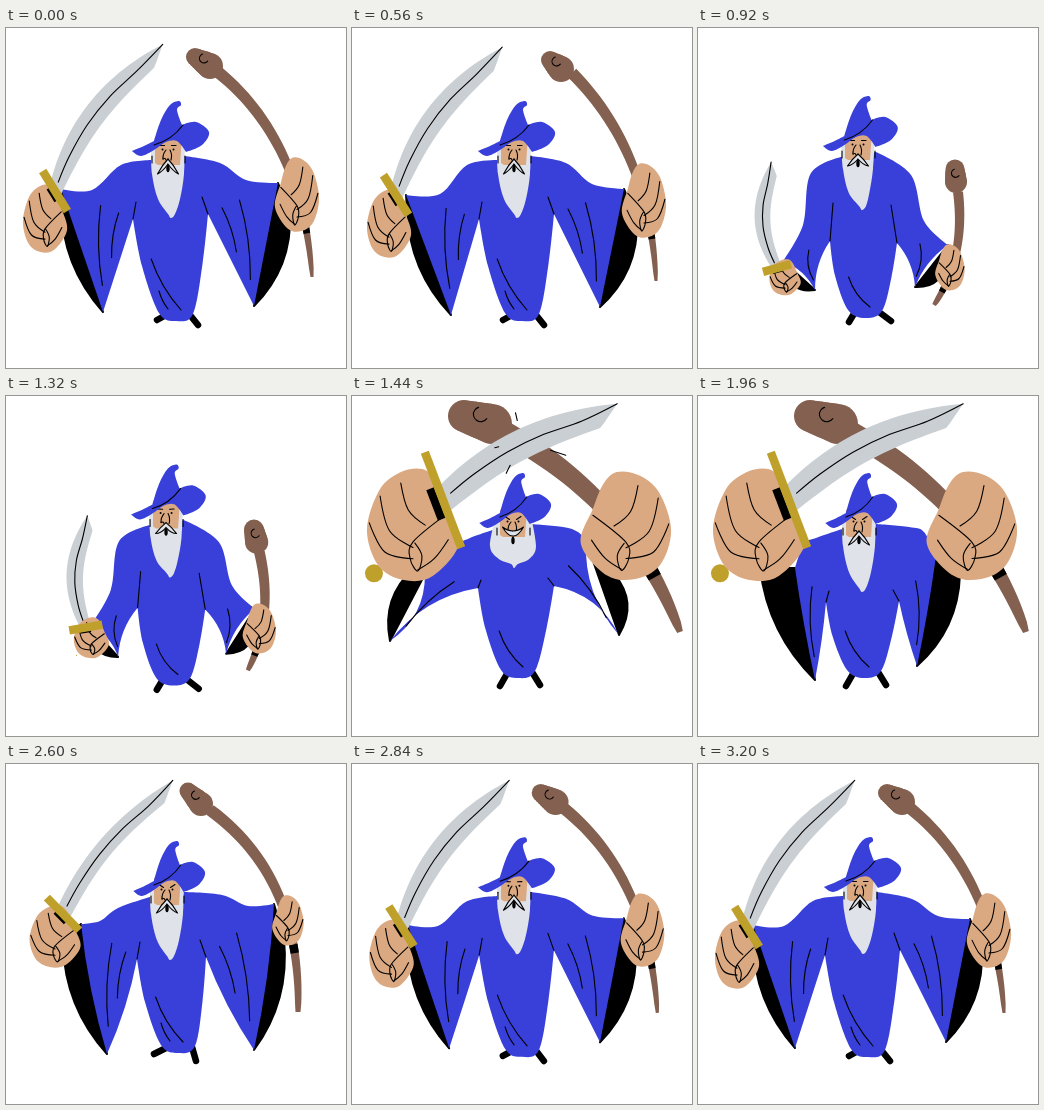
Recreate the animation shown at these times as an HTML page with a canvas. Size 340 px wide and 340 px high, loop 3720 ms.

```html
<!DOCTYPE html>
<html lang="en">
<head>
<meta charset="utf-8">
<title>Wizard</title>
<style>
html, body { margin: 0; width: 100%; height: 100%; overflow: hidden; background: #fff; }
canvas { display: block; width: 100%; height: 100%; }
</style>
</head>
<body>
<canvas id="stage"></canvas>
<script>
const LOOP = 3720, SIZE = 340;
const BLUE = '#3840d9', SKIN = '#dba981', STEEL = '#cacfd4', HAIR = '#dfe2e8',
      WOOD = '#83604f', GOLD = '#bfa02b', INK = '#000';

// Rig settings; arms and fists are listed left, right.
const rest = {
  neck: 132, hem: [170, 293], toes: [[151, 292], [192, 297]],
  fall: 0, crease: 17, full: 1, drape: 62,
  arms: [
    { shoulder: [115, 137], elbow: [86, 162], wrist: [55, 161], tip: [97, 284], heel: [55, 175], pit: [127, 191] },
    { shoulder: [214, 135], elbow: [240, 152], wrist: [272, 155], tip: [248, 278], heel: [284, 185], pit: [202, 186] }
  ],
  head: { at: [0, 0], hat: 1, brow: 0, beard: [165, 190], puff: 0, droop: 15 },
  sword: { at: [49, 163], len: 182, turn: -53.7, half: 7, bow: 21, guard: 47, tilt: 22, pommel: 0 },
  staff: { tail: [306, 249], bend: [297, 113], neck: [212, 44], thin: 1.5, thick: 6, ring: .185,
           far: [189, 29, 9], near: [204, 38, 13] },
  fists: [[39, 190, 22.5, 34], [291, 166, 22.5, 37]]
};

const sway = {
  ...rest,
  arms: [
    { ...rest.arms[0], elbow: [88, 166], wrist: [54, 167], tip: [99, 287], heel: [55, 181] },
    { ...rest.arms[1], elbow: [240, 156], wrist: [272, 161], tip: [248, 279], heel: [285, 192] }
  ],
  sword: { ...rest.sword, at: [44, 167], turn: -54.3 },
  staff: { ...rest.staff, tail: [304, 253], bend: [298, 123], neck: [220, 45], far: [198, 32, 9], near: [209, 41, 13] },
  fists: [[37, 195, 22.5, 34], [292, 172, 22.5, 37]]
};

const low = {
  neck: 128, hem: [167, 290], toes: [[151, 294], [193, 293]],
  fall: -4, crease: 38, full: 0, drape: 41,
  arms: [
    { shoulder: [113, 145], elbow: [105, 197], wrist: [85, 233], tip: [117, 262], heel: [92, 238], pit: [132, 213] },
    { shoulder: [213, 147], elbow: [226, 193], wrist: [250, 217], tip: [217, 259], heel: [246, 230], pit: [199, 215] }
  ],
  head: { at: [-2, -5], hat: .97, brow: 0, beard: [164, 182], puff: -1, droop: 12 },
  sword: { at: [79, 240], len: 106, turn: -93.2, half: 5, bow: 17, guard: 29, tilt: -12, pommel: 0 },
  staff: { tail: [236, 277], bend: [268, 229], neck: [260, 164], thin: 2, thick: 5, ring: .15,
           far: [257, 141, 9.5], near: [258, 154, 11] },
  fists: [[87, 249, 16, 18], [252, 239, 15, 23]]
};

const clash = {
  neck: 132, hem: [166, 282], toes: [[148, 290], [188, 289]],
  fall: -10, crease: 8, full: 0, drape: 47,
  arms: [
    { shoulder: [118, 142], elbow: [100, 152], wrist: [73, 178], tip: [38, 245], heel: [62, 172], pit: [126, 192] },
    { shoulder: [211, 131], elbow: [226, 136], wrist: [234, 145], tip: [267, 239], heel: [262, 178], pit: [202, 190] }
  ],
  head: { at: [-1, 4], hat: .93, brow: 2, beard: [162, 172], puff: 7, droop: -4 },
  sword: { at: [91, 104], len: 199, turn: -28.9, half: 13, bow: 19, guard: 102, tilt: 8, pommel: 9 },
  staff: { tail: [328, 236], bend: [280, 106], neck: [154, 37], thin: 3, thick: 11, ring: .24,
           far: [112, 20, 16], near: [140, 28, 20] },
  fists: [[61, 128, 47, 56], [274, 129, 46, 54]]
};

const cross = {
  ...clash, fall: 1, crease: 11,
  arms: [
    { ...clash.arms[0], elbow: [106, 148], wrist: [97, 172], tip: [117, 284], pit: [128, 206] },
    { ...clash.arms[1], wrist: [238, 160], tip: [219, 270], pit: [201, 205] }
  ],
  head: { ...clash.head, beard: [164, 196], puff: 0, droop: 14 }
};

const open = {
  neck: 132, hem: [172, 289], toes: [[148, 290], [190, 297]],
  fall: 3, crease: 17, full: 1, drape: 56,
  arms: [
    { shoulder: [112, 144], elbow: [94, 157], wrist: [75, 160], tip: [101, 290], heel: [57, 180], pit: [131, 195] },
    { shoulder: [216, 131], elbow: [242, 142], wrist: [268, 140], tip: [248, 286], heel: [278, 175], pit: [200, 193] }
  ],
  head: cross.head,
  sword: { at: [57, 150], len: 173, turn: -50.6, half: 8, bow: 14, guard: 46, tilt: 6, pommel: 0 },
  staff: { tail: [292, 248], bend: [296, 113], neck: [204, 46], thin: 2.5, thick: 6, ring: .25,
           far: [182, 27, 8.5], near: [195, 40, 12] },
  fists: [[49, 172, 26, 31], [282, 156, 16, 25]]
};

const smooth = u => u * u * (3 - 2 * u);
const speedUp = u => u * u;
const overshoot = u => 1 + (u - 1) ** 2 * (2 * (u - 1) + 1);

const MOVES = [
  { start: 0, from: rest, to: rest, count: 1, gap: 560, ease: smooth },
  { start: 560, from: rest, to: sway, count: 1, gap: 120, ease: smooth },
  { start: 680, from: sway, to: low, count: 4, gap: 80, ease: smooth },
  { start: 1320, from: low, to: clash, count: 4, gap: 40, ease: speedUp },
  { start: 1480, from: clash, to: cross, count: 13, gap: 40, ease: overshoot },
  { start: 2440, from: cross, to: open, count: 3, gap: 80, ease: smooth },
  { start: 2680, from: open, to: rest, count: 7, gap: 80, ease: overshoot }
];

function mix(a, b, k) {
  if (typeof a === 'number') return a + (b - a) * k;
  if (Array.isArray(a)) return a.map((v, i) => mix(v, b[i], k));
  return Object.fromEntries(Object.keys(a).map(key => [key, mix(a[key], b[key], k)]));
}

const canvas = document.getElementById('stage');
const ctx = canvas.getContext('2d');

const shift = (p, dx, dy) => [p[0] + dx, p[1] + dy];
const polar = (p, angle, r) => shift(p, Math.cos(angle) * r, Math.sin(angle) * r);
const rad = deg => deg * Math.PI / 180;

function fill(path, color) {
  ctx.fillStyle = color;
  ctx.fill(path);
}

function stroke(path, width = 1.1, color = INK) {
  ctx.lineWidth = width;
  ctx.strokeStyle = color;
  ctx.stroke(path);
}

// Smooth curve through points; a third value of 1 makes a corner.
function spline(pts, closed) {
  const path = new Path2D(), n = pts.length, at = i => pts[(i + n) % n];
  const slope = i => {
    const sharp = at(i)[2] || (!closed && i % (n - 1) === 0);
    return sharp ? [0, 0] : [0, 1].map(c => (at(i + 1)[c] - at(i - 1)[c]) / 6);
  };
  path.moveTo(pts[0][0], pts[0][1]);
  for (let i = 0; i < (closed ? n : n - 1); i++) {
    const p = at(i), q = at(i + 1), a = slope(i), b = slope((i + 1) % n);
    path.bezierCurveTo(p[0] + a[0], p[1] + a[1], q[0] - b[0], q[1] - b[1], q[0], q[1]);
  }
  return path;
}

function polygon(pts) {
  const path = new Path2D();
  pts.forEach(p => path.lineTo(p[0], p[1]));
  path.closePath();
  return path;
}

function disc([x, y, r], color) {
  const path = new Path2D();
  path.arc(x, y, Math.max(0, r), 0, 7);
  fill(path, color);
}

// Quadratic control point that lifts the middle of a-b sideways by bow.
function control(a, b, bow) {
  const dx = b[0] - a[0], dy = b[1] - a[1], k = 2 * bow / (Math.hypot(dx, dy) || 1);
  return [(a[0] + b[0]) / 2 - dy * k, (a[1] + b[1]) / 2 + dx * k];
}

function arcLine(a, b, bow = 0, width, color) {
  const path = new Path2D();
  path.moveTo(...a);
  path.quadraticCurveTo(...control(a, b, bow), ...b);
  stroke(path, width, color);
}

// Samples of edge(u, sign) down one side and back up the other.
function ribbon(edge, from = 0, to = 1) {
  const n = 30, us = Array.from({ length: n + 1 }, (_, i) => from + (to - from) * i / n);
  return polygon([...us.map(u => edge(u, -1)), ...us.reverse().map(u => edge(u, 1))]);
}

function drawCuff(arm, side) {
  const { wrist, tip, heel } = arm, path = new Path2D();
  path.moveTo(...wrist);
  path.lineTo(...heel);
  path.quadraticCurveTo(...control(heel, tip, 11 * side), ...tip);
  path.closePath();
  fill(path, INK);
  stroke(path, 2);
}

function drawSleeve(arm, side, neck, fall) {
  const { shoulder, elbow, wrist, tip, pit } = arm;
  const path = spline([neck, shoulder, elbow, wrist]);
  path.quadraticCurveTo(...control(wrist, tip, fall * side), ...tip);
  path.quadraticCurveTo(...control(tip, pit, fall * side), ...pit);
  path.lineTo(162, 150);
  path.closePath();
  fill(path, BLUE);
}

function drawFolds(arm, side, pose) {
  const { wrist, tip, pit } = arm, full = Math.max(0, pose.full);
  const a = mix(pit, wrist, .45), b = mix(pit, wrist, .2);
  arcLine(a, mix(tip, a, .25), 3 * side);
  if (full) arcLine(b, mix(b, tip, .45 * full), 2 * side);
  arcLine(shift(pit, side > 0 ? 3 : -6, -pose.crease), pit);
}

function drawRobe(pose) {
  const { hem, arms, neck } = pose, [left, right] = arms;
  const necks = [[147, neck], [178, neck - 4]];
  const hemL = shift(hem, -17, -8), hemR = shift(hem, 17, -7);
  pose.toes.forEach((toe, i) => arcLine(shift(hem, i ? 14 : -10, -6), toe, 0, 6.5));
  arms.forEach((arm, i) => drawCuff(arm, i ? -1 : 1));
  fill(spline([
    [...necks[0], 1], [...left.pit, 1], shift(mix(left.pit, hemL, .5), -4, 0), hemL, hem,
    hemR, shift(mix(right.pit, hemR, .5), 2, 0), [...right.pit, 1], [...necks[1], 1]
  ], true), BLUE);
  arms.forEach((arm, i) => drawSleeve(arm, i ? -1 : 1, necks[i], pose.fall));
  arms.forEach((arm, i) => drawFolds(arm, i ? -1 : 1, pose));
  arcLine(shift(hem, -.4 * pose.drape, -pose.drape), shift(hem, 5, -11), 3);
  const seam = shift(hem, -17, -30);
  if (pose.full > 0) arcLine(seam, mix(seam, shift(hem, -8, -12), pose.full), 1);
}

const HAT = [[126, 123, 1], [138, 118], [148, 113, 1], [155, 92], [164, 77], [173, 73], [175, 77],
  [171, 82], [176, 97, 1], [190, 94], [203, 104], [196, 117], [180, 124, 1], [171, 113], [160, 114],
  [148, 122], [135, 128]];

function drawHead({ at, hat, brow, beard, puff, droop }) {
  const [tx, ty] = shift(beard, -at[0], -at[1]);
  const y = mix(148, ty, .55);
  ctx.save();
  ctx.translate(...at);
  fill(spline([[145, 116, 1], [146 - puff, 146], [152 - puff * .6, y], [tx - 3, ty - 4], [tx, ty],
    [tx + 4, ty - 4], [174 + puff * .6, y], [178 + puff, 146], [179, 112, 1]], true), HAIR);
  fill(polygon([[149, 110], [149, 135], [152, 137], [174, 137], [176, 108]]), SKIN);
  arcLine([160, 122], [157, 131], 1);
  arcLine([157, 131], [160, 132], -1);
  arcLine([164, 122], [165, 132], -1);
  for (const side of [-1, 1]) {
    const x = 162 + side * 5.5, mouth = new Path2D();
    arcLine([x - side * 2, 117.5 + brow], [x + side * 2.5, 117.5 - brow / 2]);
    disc([x, 121.5, 1], INK);
    arcLine([162.5 + side * 16.5, 128], [162.5 + side * 16.5, 135]);
    mouth.moveTo(162, 131);
    mouth.quadraticCurveTo(162 + side * 6, 132 + droop * .35, 162 + side * 10.5, 131 + droop);
    mouth.quadraticCurveTo(162 + side * 5, 138 + droop * .35, 162, 136);
    fill(mouth, HAIR);
    stroke(mouth);
  }
  const lips = new Path2D();
  lips.ellipse(162, 140.5, 1.7, 3.8, 0, 0, 7);
  fill(lips, INK);
  ctx.translate(160, 116);
  ctx.scale(hat, 1);
  ctx.translate(-160, -116);
  fill(spline(HAT, true), BLUE);
  arcLine([148, 117], [177, 97], 3);
  ctx.restore();
}

function drawStaff({ tail, bend, neck, thin, thick, ring, far, near }) {
  const edge = (u, sign) => {
    const a = mix(tail, bend, u), b = mix(bend, neck, u);
    const dir = Math.atan2(b[1] - a[1], b[0] - a[0]);
    return polar(mix(a, b, u), dir + sign * Math.PI / 2, mix(thin, thick, Math.sqrt(u)));
  };
  fill(ribbon(edge), WOOD);
  fill(ribbon(edge, ring - .018, ring + .018), INK);
  for (let i = 0; i <= 6; i++) disc(mix(far, near, i / 6), WOOD);
  const [x, y, r] = mix(far, near, .6), swirl = new Path2D();
  swirl.arc(x, y - r * .35, r * .4, .2 * Math.PI, 1.4 * Math.PI);
  stroke(swirl);
}

function drawSword({ at, len, turn, half, bow }) {
  const dir = rad(turn);
  const upper = u => half * (1 - u) + bow * 4 * u * (1 - u);
  const lower = u => u < .87 ? 9 * Math.sin(1.15 * Math.PI * u) - half : -half * (1 - u) / .13;
  const spot = (u, off) => polar(polar(at, dir, len * u), dir - Math.PI / 2, off);
  fill(ribbon((u, sign) => spot(u, sign < 0 ? upper(u) : lower(u))), STEEL);
  const ridge = [.05, .2, .4, .6, .8, 1].map(u => spot(u, (upper(u) + lower(u)) / 2));
  stroke(spline(ridge));
}

function drawGuard({ at, turn, guard, tilt }) {
  const dir = rad(turn), across = dir + Math.PI / 2 + rad(tilt);
  const back = polar(at, dir, -2 - guard * .06);
  ctx.lineCap = 'butt';
  arcLine(polar(back, across, -guard * .16), polar(back, across, guard * .16), 0, guard * .08);
  arcLine(polar(at, across, -guard / 2), polar(at, across, guard / 2), 0, 8.5, GOLD);
  ctx.lineCap = 'round';
}

// Fist in units of its half width and half height.
const FIST = [[.2, -.98], [-.28, -.92], [-.72, -.6], [-.98, .1], [-.74, .74], [-.2, 1], [.42, .93],
  [.98, .35], [.72, -.3], [.5, -.75]];
const CREASES = [
  [[-.26, -.73], [-.1, -.25], [.26, .02]],
  [[-.7, -.5], [-.5, .12], [0, .42]],
  [[-.93, -.02], [-.6, .5], [0, .62]],
  [[.72, -.18], [0, .32], [-.06, .62], [.1, .84], [.19, .57], [.04, .34]],
  [[.75, .28], [.45, .62], [.1, .82]]
];

function drawFist([x, y, w, h], side) {
  const place = ([u, v]) => [x + side * u * w, y + v * h];
  fill(spline(FIST.map(place), true), SKIN);
  CREASES.forEach(line => stroke(spline(line.map(place))));
}

function drawSparks() {
  const lengths = [8, 4, 9, 16];
  [-103, 166, 116, 18].forEach((deg, i) => {
    const a = polar([170, 45], rad(deg), 21 + i * 3);
    arcLine(a, polar(a, rad(deg), lengths[i]));
  });
}

function drawWizard(pose) {
  const { sword, fists } = pose;
  drawRobe(pose);
  drawHead(pose.head);
  drawStaff(pose.staff);
  drawFist(fists[1], -1);
  drawSword(sword);
  const [x, y, w, h] = fists[0];
  disc([x - w * .83, y + h * .88, sword.pommel], GOLD);
  drawFist(fists[0], 1);
  drawGuard(sword);
}

function draw(t) {
  const scale = devicePixelRatio || 1;
  const w = Math.round(innerWidth * scale), h = Math.round(innerHeight * scale);
  if (canvas.width !== w || canvas.height !== h) [canvas.width, canvas.height] = [w, h];
  ctx.setTransform(w / SIZE, 0, 0, h / SIZE, 0, 0);
  ctx.clearRect(0, 0, SIZE, SIZE);
  ctx.lineCap = ctx.lineJoin = 'round';
  const move = MOVES.filter(m => m.start <= t).pop();
  const step = Math.min(move.count, Math.floor((t - move.start) / move.gap) + 1);
  drawWizard(mix(move.from, move.to, move.ease(step / move.count)));
  if (t >= 1440 && t < 1520) drawSparks();
}

const begin = performance.now();
function tick() {
  draw((performance.now() - begin) % LOOP);
  requestAnimationFrame(tick);
}
tick();
</script>
</body>
</html>
```
